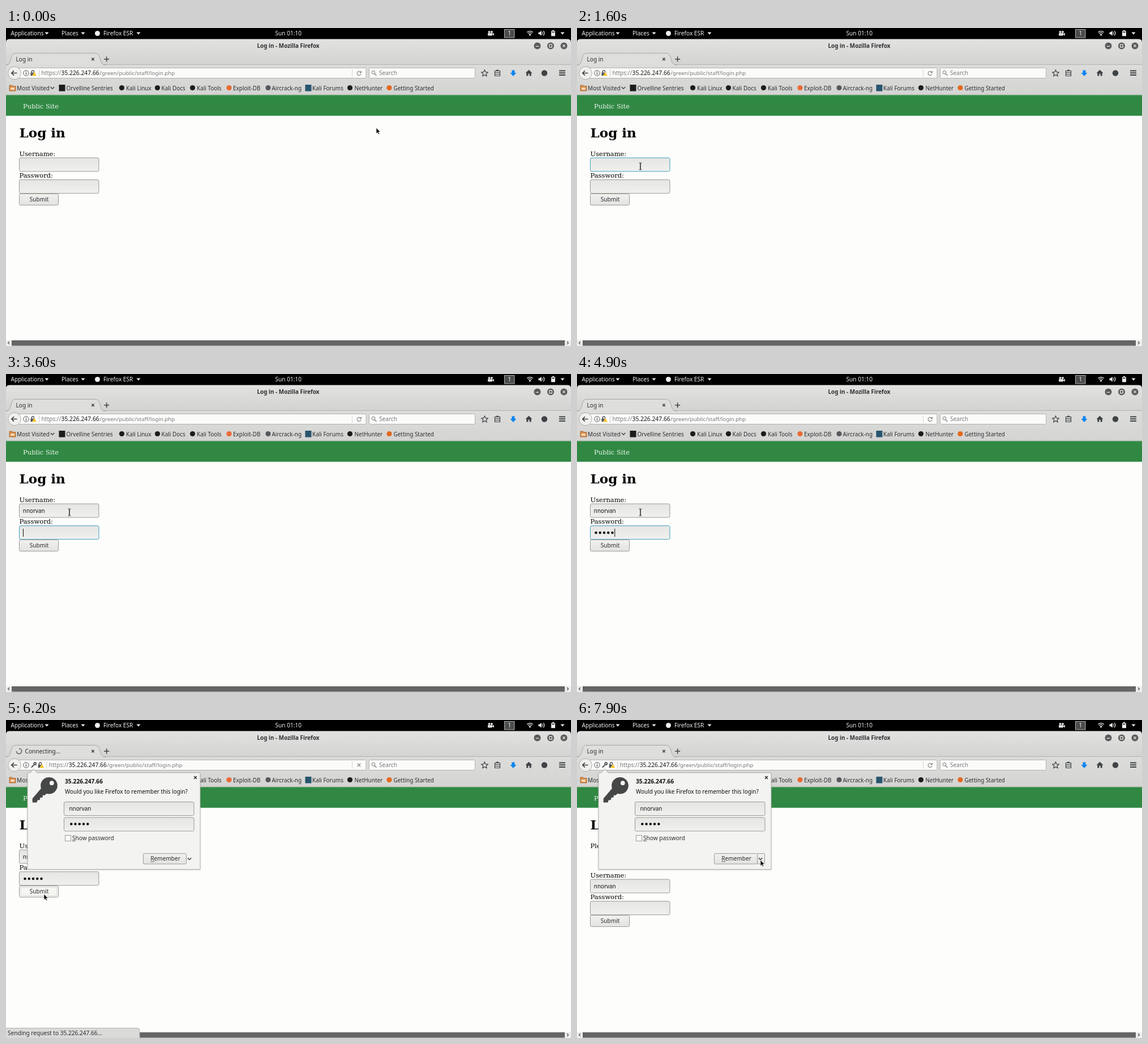
An HTML page that plays this animation: 998 px wide and 561 px high, repeating every 8 s.

```html
<!DOCTYPE html>
<html lang="en">
<head>
<meta charset="utf-8">
<title>Log in</title>
<style>
html, body { margin: 0; width: 100%; height: 100%; overflow: hidden; background: #fdfdfc; }
svg { display: block; width: 998px; height: 561px; }
text { font-family: "Noto Sans", "Open Sans", sans-serif; font-size: 10.1px; fill: #2b2f30; white-space: pre; }
.page { font-family: "DejaVu Serif", serif; font-size: 11.5px; fill: #000; }
.line { fill: none; stroke: #3f4345; stroke-width: 1.2; }
</style>
</head>
<body>
<svg id="stage" viewBox="0 0 998 561" xmlns="http://www.w3.org/2000/svg"></svg>
<script>
const LOOP = 8000, USER = "nnorvan", HOST = "35.226.247.66";
const INK = "#3f4345";

// Markup helpers
const text = (x, y, s, attrs = "") => `<text x="${x}" y="${y}" ${attrs}>${s}</text>`;
const rect = (x, y, w, h, fill, attrs = "") =>
  `<rect x="${x}" y="${y}" width="${w}" height="${h}" fill="${fill}" ${attrs}/>`;
const path = (d, fill = "none", attrs = "") => `<path d="${d}" fill="${fill}" ${attrs}/>`;
const line = (d, attrs = "") => `<path class="line" d="${d}" ${attrs}/>`;
const circle = (x, y, r, fill, attrs = "") => `<circle cx="${x}" cy="${y}" r="${r}" fill="${fill}" ${attrs}/>`;
const group = (id, s, attrs = "") => `<g id="${id}" ${attrs}>${s}</g>`;
const grad = (id, a, b) => `<linearGradient id="${id}" x1="0" y1="0" x2="0" y2="1">
  <stop stop-color="${a}"/><stop offset="1" stop-color="${b}"/></linearGradient>`;
const field = (id, x, y, w, h) =>
  rect(x, y, w, h, "url(#input)", `id="${id}" rx="2.5" stroke="#9b9b91"`);
const dots = (id, x, y) => group(id,
  [0, 1, 2, 3, 4].map(i => circle(x + i * 7.25, y, 2.25, "#111")).join(""));
const down = (x, y, fill) => path(`M${x - 3.5} ${y - 1.8}h7l-3.5 4z`, fill);
const cross = (x, y, r, attrs) => line(`M${x - r} ${y - r}l${2 * r} ${2 * r}m0 ${-2 * r}l${-2 * r} ${2 * r}`, attrs);

function topBar() {
  const white = 'style="fill:#eeeeec"';
  return rect(0, 0, 998, 27, "#000") +
    text(8.5, 13, "Applications", white) + down(72, 9.4, "#eee") +
    text(98, 13, "Places", white) + down(136, 9.4, "#eee") +
    circle(161.5, 9.5, 4.5, "#eee") + text(172, 13, "Firefox ESR", white) + down(234, 9.4, "#eee") +
    text(475.5, 13, "Sun 01:10", white) +
    circle(853.5, 7, 2, "#ddd") + circle(858, 7, 2, "#ddd") + rect(851, 9, 8, 4.5, "#ddd", 'rx="1"') +
    path("M859 10.5l3-2v5l-3-2z", "#ddd") +
    rect(880.5, 2.5, 17.5, 14.5, "#4b4d4d", 'stroke="#b4b4b2"') + text(886.5, 13.4, "1", white) +
    path("M925.5 14l-2.2-2.8q2.2-1.6 4.4 0z", "#eee") +
    line("M922 9.8q3.5-2.8 7 0M920.3 7.6q5.2-4 10.4 0", 'style="stroke:#eee"') +
    path("M940.5 7.5h2.2l3-2.7v9l-3-2.7h-2.2z", "#eee") +
    line("M947.3 7q1.6 2.3 0 4.6M949.3 5.2q3.2 4 0 8.2", 'style="stroke:#eee"') +
    path("M965 4h3v1.3h2v9h-7v-9h2z", "#eee") + rect(964.2, 6.5, 4.6, 1.6, "#222") +
    down(983, 9.4, "#eee");
}

function windowTop() {
  const button = x => circle(x, 31.5, 6, "#5a5c5b");
  const pale = 'style="stroke:#eee"';
  return path("M0 65V25.5q0-6 6-6H992q6 0 6 6V65z", "url(#title)") +
    text(443.5, 35, "Log in - Mozilla Firefox", 'font-weight="700" style="font-size:9.9px"') +
    button(938.5) + button(962) + button(985.5) +
    line("M935.7 32.3h5.6", pale) + line("M959.7 29.2h4.6v4.6h-4.6z", pale) + cross(985.5, 31.5, 2.1, pale) +
    rect(0, 65, 998, 54, "url(#tools)") + rect(0, 64, 998, 1, "#b4b4b1") +
    path("M0 65.5C6 65.5 7 61 9 54C11 47 12 44.5 18 44.5H156C163 44.5 164 48 166 54C168 61 169 65.5 177 65.5", "#dededc", 'stroke="#a6a6a2"') +
    cross(153.5, 55, 2.2, 'style="stroke-width:1.6"') + line("M173.2 55h9M177.7 50.5v9", 'style="stroke-width:1.5"') +
    text(17.5, 58.7, "Log in", 'id="tabTitle"') +
    group("spinner", path("M0-4.6A4.6 4.6 0 1 1-4.6 0", "none", 'stroke="#666" stroke-width="1.7"'));
}

function toolbar() {
  const grey = 'style="fill:#777a7a"';
  return rect(18.5, 70.5, 617.5, 18, "#fbfbfa", 'rx="2" stroke="#b2b2ae"') +
    circle(15, 79.5, 11.3, "#f0f0ee", 'stroke="#acaca8"') +
    line("M19.5 79.5h-9M14 75.3l-4.2 4.2 4.2 4.2", 'style="stroke-width:1.7"') +
    circle(35.5, 79.5, 4.8, "none", 'stroke="#555"') + line("M35.5 78.5v3.8M35.5 76.2v1.2") +
    group("urlKey", circle(51.2, 77, 2, "none", 'stroke="#555" stroke-width="1.8"') +
      line("M49.5 78.7l-5 5M46.5 81.5l1.3 1.3", 'style="stroke-width:1.6"')) +
    group("url",
      line("M45.2 79v-1.8q0-2.4 2.2-2.4t2.2 2.4V79") + rect(43.5, 78.5, 7.5, 5.8, "#555") +
      path("M50.2 77.5l4 7h-8z", "#f5c211", 'stroke="#fbfbfa" stroke-width=".5"') +
      rect(58, 73, 1, 13, "#ccc") +
      text(62.5, 83, "https://", grey) +
      text(97.5, 83, HOST, 'style="font-size:10.3px;fill:#151818"') +
      text(165.3, 83, "/green/public/staff/login.php", 'style="font-size:9.75px;fill:#777a7a"')) +
    rect(611, 73, 1, 13, "#d2d2cf") +
    group("reload", line("M626.7 78.2A3.5 3.5 0 1 0 627 81", 'style="stroke:#888"') + path("M628 75.2v4h-4z", "#888")) +
    group("stop", cross(623.5, 79.5, 2.8, 'style="stroke:#777"')) +
    rect(641.5, 70.5, 187, 18, "#fbfbfa", 'rx="2" stroke="#b2b2ae"') +
    circle(649, 78.3, 2.9, "none", 'stroke="#777"') + line("M651 80.5l3.5 3.7", 'style="stroke:#777"') +
    text(659, 83, "Search", grey) +
    line("M845.5 74l1.7 3.7 4 .4-3 2.7.9 4-3.6-2.1-3.6 2.1.9-4-3-2.7 4-.4z") +
    line("M863.5 75.5h9v9h-9zM863.5 78.5h9M863.5 81.5h9") + rect(866, 73.7, 4, 2.5, INK) +
    path("M893.5 74.5h5v4.5h3l-5.5 6-5.5-6h3z", "#0a84f0") +
    path("M923.5 73.8l6 5.7h-1.8v5h-3v-3.7h-2.4v3.7h-3v-5h-1.8z", INK) +
    circle(951, 79.5, 5.2, INK) +
    line("M977 75.5h11M977 79.3h11M977 83.1h11", 'style="stroke-width:2"');
}

function bookmarks() {
  const dark = "#1c1c1c";
  // label, text x, mark x, mark colour, square mark
  const items = [
    ["Orvelline Sentries", 106.5, 99, dark, 1], ["Kali Linux", 212, 204.5, dark], ["Kali Docs", 274.5, 267.5, dark],
    ["Kali Tools", 337, 329.5, dark], ["Exploit-DB", 401, 394, "#ea6a33"], ["Aircrack-ng", 469.5, 463, "#55595b"],
    ["Kali Forums", 541, 534, "#28556f", 1], ["NetHunter", 615.5, 607.5, dark], ["Getting Started", 684.5, 677, "#e3691f"]
  ];
  return path("M6 101h4.5l1.3 1.6H17V111H6z", "#d58a48", 'stroke="#a9632a" stroke-width=".8"') +
    rect(8, 105, 7, 4, "#f3d7b5") +
    text(19, 109.5, "Most Visited") + line("M78.8 104l3.2 3.2 3.2-3.2", 'style="stroke-width:1.5"') +
    items.map(([s, x, mx, c, square]) => text(x, 109.5, s, 'style="font-size:9.95px"') +
      (square ? rect(mx - 5.5, 100, 11, 11.5, c) : circle(mx, 105.5, 4.6, c))).join("") +
    rect(0, 117.5, 998, 1, "#a9b0a6");
}

function page() {
  return rect(0, 118, 998, 443, "#fdfdfc") + rect(0, 118.3, 998, 36.5, "#308843") +
    text(30, 141.8, "Public Site", 'class="page" style="fill:#eef5ee"') +
    text(23.5, 192.7, "Log in", 'class="page" style="font-size:23.1px;font-weight:700"') +
    group("errors", text(23.5, 225.7, "Please fix the following errors:", 'class="page"')) +
    group("form",
      text(23.5, 225.7, "Username:", 'class="page"') + field("userBox", 23.5, 229, 140.5, 24) +
      text(29.8, 244.8, "", 'id="user" style="font-size:9.85px;fill:#111"') +
      text(23.5, 264.3, "Password:", 'class="page"') + field("passBox", 23.5, 267.7, 140.5, 24) +
      dots("pass", 33.5, 280) +
      rect(23.5, 292.5, 69, 20, "url(#button)", 'id="submitBox" rx="2" stroke="#9b9b97"') +
      rect(26, 295, 64, 15, "none", 'id="submitRing" stroke="#a9a9a4" stroke-dasharray="1 1" stroke-width=".8"') +
      text(41.8, 306.2, "Submit", 'id="submitText"') +
      rect(0, 0, 1, 14, "#111", 'id="caret"')) +
    rect(0, 550.5, 998, 10.5, "#eeeeec") + rect(10, 551, 977, 9.5, "#646564") +
    line("M6 553.3l-2.4 2.3 2.4 2.3M991 553.3l2.4 2.3-2.4 2.3") +
    group("status", path("M-1 543.5H232q4 0 4 4V562H-1z", "#dadad8", 'stroke="#b4b4b0"') +
      text(3, 556, `Sending request to ${HOST}...`));
}

function popup() {
  return group("popup",
    path("M38 95q0-2 2-2H43l6-6.5 6 6.5H341q2 0 2 2V263.5H38z", "#f3f3f1", 'stroke="#adada8" filter="url(#shade)"') +
    path("M63 119.5l9.5 9.5-4.5 4-3-.5-.5 4-4 .5-.8 4-4 .5-1.2 4H46.7V138.5z", "#454746") +
    circle(76, 115.8, 14.8, "#454746") + circle(80.8, 111.2, 3.9, "#f3f3f1") +
    text(104, 111.5, HOST, 'style="font-weight:700;font-size:10.2px;fill:#111"') +
    text(104, 130, "Would you like Firefox to remember this login?", 'style="font-size:9.95px;fill:#111"') +
    cross(334.5, 101.5, 2.3, 'style="stroke-width:1.7"') +
    field("", 102.5, 144.5, 229.5, 24) + text(111.5, 159.5, USER, 'style="font-size:9.85px;fill:#111"') +
    field("", 102.5, 172, 229.5, 24) + dots("", 115.3, 183.6) +
    rect(104.5, 203.5, 10, 10, "#fbfbfa", 'stroke="#9b9b97"') +
    text(117, 212, "Show password") + rect(117, 213, 6, .8, INK) +
    rect(242.5, 235.5, 76, 18.5, "url(#button)", 'rx="2" stroke="#9b9b97"') +
    text(255.3, 248.3, "Remember") + rect(255.5, 249.5, 6.5, .8, INK) +
    rect(318.5, 235.5, 13, 18.5, "url(#button)", 'id="menuBox" rx="1.5" stroke="#9b9b97"') +
    line("M320.8 243.3l3.2 3.2 3.2-3.2", 'style="stroke-width:1.5"'));
}

const stage = document.getElementById("stage");
stage.innerHTML = `<defs>${grad("title", "#e2e2e0", "#d3d3d1")}${grad("tools", "#dcdcda", "#d4d4d2")}
  ${grad("input", "#e5e5e3", "#f0f0ee")}${grad("button", "#f1f1ef", "#e3e3e1")}
  <filter id="shade" x="-5%" y="-5%" width="110%" height="112%"><feDropShadow dx="0" dy="1" stdDeviation="1" flood-opacity=".15"/></filter></defs>` +
  topBar() + windowTop() + toolbar() + bookmarks() + page() + popup() +
  group("arrow", path("M0 0V10.4L2.4 8.2L4 11.8L5.7 11L4.1 7.6H7.2Z", "#000", 'stroke="#fff" stroke-width=".7"')) +
  group("beam", line("M-2.3-6H-.8Q0-6 0-5V5Q0 6-.8 6H-2.3M2.3-6H.8Q0-6 0-5V5Q0 6 .8 6H2.3", 'style="stroke:#222;stroke-width:1"'));

const $ = id => document.getElementById(id);
const set = (id, key, value) => $(id).setAttribute(key, value);
const show = (id, on) => set(id, "visibility", on ? "visible" : "hidden");
const clamp = v => Math.max(0, Math.min(1, v));
const count = (times, t) => times.filter(at => t >= at).length;

const LETTERS = [2100, 2300, 2500, 2700, 2900, 3100, 3300];
const BULLETS = [3700, 4000, 4200, 4500, 4800];
const FOCUS = 800, TAB = 3500, PRESS = 5600, RELEASE = 5800, LOAD = 5900, ASK = 6000, STATUS = 6200, DONE = 6800;
// start, end, from, to
const MOVES = [
  [0, 700, [654, 176], [112, 244]],
  [4900, 5400, [112, 244], [67, 307]],
  [7100, 7700, [67, 307], [324, 247]]
];

function pointer(t) {
  const [a, b, from, to] = MOVES.filter(m => t >= m[0]).pop();
  const u = clamp((t - a) / (b - a)), k = u * u * (3 - 2 * u);
  return from.map((v, i) => v + (to[i] - v) * k);
}

function draw(t) {
  const loading = t >= LOAD && t < DONE, done = t >= DONE, asked = t >= ASK;
  const inUser = t >= FOCUS && t < TAB, inPass = t >= TAB && t < PRESS;
  const [x, y] = pointer(t);

  $("user").textContent = USER.slice(0, count(LETTERS, t));
  const typed = done ? 0 : count(BULLETS, t);
  [...$("pass").children].forEach((dot, i) => dot.setAttribute("visibility", i < typed ? "visible" : "hidden"));
  set("userBox", "stroke", inUser ? "#429fc3" : "#9b9b91");
  set("passBox", "stroke", inPass ? "#429fc3" : "#9b9b91");

  const last = [FOCUS, ...LETTERS, TAB, ...BULLETS].filter(k => k <= t).pop();
  show("caret", (inUser || inPass) && (t - last) % 1200 < 600);
  set("caret", "x", inUser ? 29.9 + $("user").getComputedTextLength() : 30 + typed * 7.25);
  set("caret", "y", inUser ? 234 : 273);

  const pressed = t >= PRESS && t < RELEASE;
  const hover = !done && y > 292 && x < 93;
  set("submitBox", "fill", pressed ? "#b9b9b7" : hover ? "#f5f5f2" : "url(#button)");
  set("submitText", "x", pressed ? 42.5 : 41.8);
  show("submitRing", t >= PRESS && !done);
  set("form", "transform", `translate(0 ${done ? 52 : 0})`);
  show("errors", done);

  $("tabTitle").textContent = loading ? "Connecting..." : "Log in";
  set("tabTitle", "x", loading ? 33.5 : 17.5);
  show("spinner", loading);
  set("spinner", "transform", `translate(23 55) rotate(${(t - STATUS) * .45})`);
  show("reload", !loading);
  show("stop", loading);
  show("status", t >= STATUS && !done);

  show("urlKey", asked);
  set("url", "transform", `translate(${asked ? 13.2 : 0} 0)`);
  show("popup", asked);
  set("popup", "opacity", clamp((t - ASK + 100) / 200));
  $("menuBox").style.display = x > 318 && y > 235 && y < 254 && asked ? "" : "none";

  const overField = x > 23 && x < 164 && (y > 229 && y < 253 || y > 267.5 && y < 292) && !asked;
  show("beam", overField);
  show("arrow", !overField);
  set(overField ? "beam" : "arrow", "transform", `translate(${x} ${y})`);
}

function tick() {
  draw(Math.floor(performance.now() % LOOP / 100) * 100);
  requestAnimationFrame(tick);
}
tick();
</script>
</body>
</html>
```
